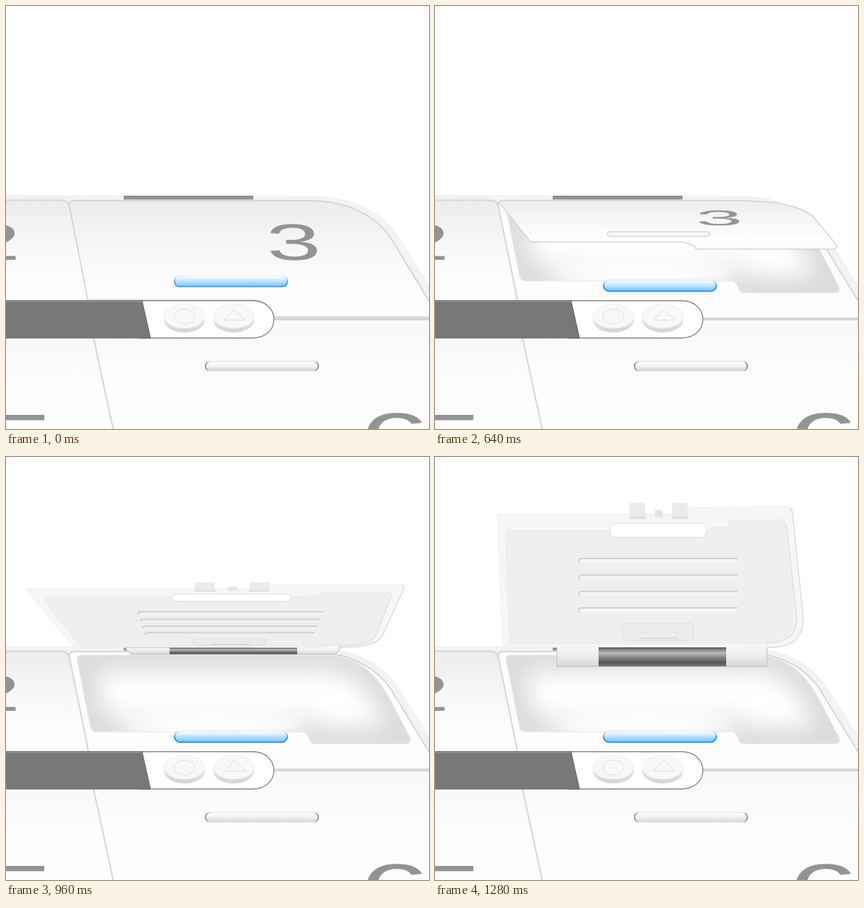
An HTML page that plays this animation: 600 px wide and 600 px high, repeating every 1920 ms.

```html
<!DOCTYPE html>
<html lang="en">
<head>
<meta charset="utf-8">
<title>Compartment lid</title>
<style>
  html, body { margin: 0; width: 100%; height: 100%; overflow: hidden; background: #fff; }
  svg { display: block; width: 100%; height: 100%; }
  text { font-family: "Liberation Sans", Arial, sans-serif; fill: #939393; text-anchor: middle; }
  .seam { fill: none; stroke: #d6d6d6; stroke-width: 2; }
</style>
</head>
<body>
<svg viewBox="0 0 600 600">
  <defs>
    <linearGradient id="panel" x2="0" y2="1">
      <stop stop-color="#ececec"/><stop offset=".25" stop-color="#f3f3f3"/><stop offset=".8" stop-color="#fefefe"/>
    </linearGradient>
    <linearGradient id="lower" x2="0" y2="1">
      <stop stop-color="#f8f8f8"/><stop offset=".5" stop-color="#fdfdfd"/>
    </linearGradient>
    <linearGradient id="blue" x2="0" y2="1">
      <stop stop-color="#fcfeff"/><stop offset=".25" stop-color="#e6f3ff"/><stop offset=".85" stop-color="#8ccaff"/><stop offset="1" stop-color="#9ad1ff"/>
    </linearGradient>
    <linearGradient id="paleBlue" x2="0" y2="1">
      <stop offset=".1" stop-color="#fff"/><stop offset=".45" stop-color="#f2f9ff"/><stop offset=".9" stop-color="#bfe0fa"/>
    </linearGradient>
    <linearGradient id="blueEdge" x2="0" y2="1">
      <stop stop-color="#eef1f4"/><stop offset=".25" stop-color="#a9cdec"/><stop offset=".55" stop-color="#2e9bf2"/><stop offset="1" stop-color="#1e94f4"/>
    </linearGradient>
    <linearGradient id="grey" x2="0" y2="1">
      <stop stop-color="#fff"/><stop offset=".45" stop-color="#f4f4f4"/><stop offset="1" stop-color="#d2d2d2"/>
    </linearGradient>
    <linearGradient id="greyEdge">
      <stop stop-color="#777"/><stop offset=".04" stop-color="#e6e6e6"/><stop offset=".96" stop-color="#e6e6e6"/><stop offset="1" stop-color="#777"/>
    </linearGradient>
    <linearGradient id="metal" x2="0" y2="1">
      <stop stop-color="#505050"/><stop offset=".1" stop-color="#7c7c7c"/><stop offset=".3" stop-color="#bcbcbc"/>
      <stop offset=".5" stop-color="#8c8c8c"/><stop offset=".8" stop-color="#585858"/><stop offset="1" stop-color="#767676"/>
    </linearGradient>
    <linearGradient id="hingeFill" x2="0" y2="1">
      <stop stop-color="#f4f4f4"/><stop offset=".4" stop-color="#efefef"/><stop offset="1" stop-color="#d6d6d6"/>
    </linearGradient>
    <linearGradient id="buttonSide" x2="0" y2="1">
      <stop stop-color="#f5f5f5"/><stop offset="1" stop-color="#d4d4d4"/>
    </linearGradient>
    <filter id="soft" x="-30%" y="-60%" width="160%" height="220%"><feGaussianBlur stdDeviation="16"/></filter>
    <path id="cavity" d="M106,281H460C508,286 528,314 545,344L573,398Q576,407 566,407H438Q432,407 430,399Q427,390 419,390H128Q122,390 120,384L101,288Q100,281 106,281Z"/>
    <clipPath id="cavityClip"><use href="#cavity"/></clipPath>
    <g id="button">
      <ellipse cy="5" rx="29" ry="17" fill="url(#buttonSide)"/>
      <ellipse cy="-1" rx="29" ry="17" fill="#f8f8f8" stroke="#efefef"/>
    </g>
  </defs>

  <!-- body -->
  <path d="M0,269L430,270C502,271 538,298 558,330L600,397V600H0Z" fill="#f3f3f3" stroke="#eee"/>
  <path d="M0,276H80Q88,276 89,283L117,418H0Z" fill="url(#panel)"/>
  <path d="M90,283Q89,276 97,276H430C490,277 525,300 545,328L600,418V446H120Z" fill="#fdfdfd"/>
  <path class="seam" d="M0,275.500H80Q88,276 89.500,284Q89,276 97,276H430C490,277 525,300 545,328L600,418M89.500,282L117,418"/>
  <path d="M0,471H124L152,600H0Z" fill="url(#lower)"/>
  <path d="M118,446H600V600H152Z" fill="url(#lower)"/>
  <path class="seam" d="M124,470L152,600"/>
  <rect x="167" y="269" width="184" height="5.500" fill="#8f918f"/>
  <text transform="matrix(1.91 0 0 1 -18 360)" font-size="72.600">2</text>
  <text transform="matrix(1.8 0 0 1 19 649)" font-size="100">5</text>
  <text transform="matrix(1.8 0 .05 1 554 647)" font-size="100">6</text>

  <use href="#cavity" fill="#fff"/>
  <g clip-path="url(#cavityClip)">
    <use href="#cavity" fill="none" stroke="#dadada" stroke-width="46" filter="url(#soft)"/>
    <ellipse cx="295" cy="380" rx="135" ry="28" fill="#fff" filter="url(#soft)"/>
  </g>
  <use href="#cavity" fill="none" stroke="#e9e9e9"/>
  <rect x="239" y="388.500" width="160" height="16" rx="8" fill="url(#blue)" stroke="url(#blueEdge)" stroke-width="2"/>

  <g id="outer">
    <path class="fold" d="M90,283Q89,276 97,276L430,276C490,277 525,300 545,328L605,427Q611,441 602,441L380,441C378,428 366,417 348,417L116,417Z" fill="url(#panel)" stroke="#d4d4d4" stroke-width="1.500"/>
    <text id="three" font-size="72.600">3</text>
    <path id="slot" class="fold" stroke-width="1.500"/>
    <path id="slotEnds" d="M242,387Q237,391 244,397M397,387Q402,391 395,397" fill="none" stroke="#3d9fee" stroke-width="1.500"/>
  </g>

  <path class="seam" d="M378,444H600" style="stroke-width:4"/>

  <!-- control strip -->
  <path d="M190,418H350C367,418 380,429 380,444.500S367,471 350,471H190Z" fill="#fff" stroke="#858585" stroke-width="1.300"/>
  <path d="M0,417H193L205,471H0Z" fill="#787878"/>
  <path d="M0,418.500H193" stroke="#8a8a8a" stroke-width="3"/>
  <path d="M193,418L205,471H0" fill="none" stroke="#666"/>
  <use href="#button" x="253" y="441"/>
  <ellipse cx="253" cy="440.500" rx="15" ry="10.500" fill="none" stroke="#dedede"/>
  <use href="#button" x="323" y="441"/>
  <path d="M310,445.500L324,430.500L340,445.500Z" fill="none" stroke="#dedede"/>
  <rect x="283" y="504" width="160" height="14" rx="7" fill="url(#grey)" stroke="url(#greyEdge)" stroke-width="1.500"/>

  <path id="sliver" d="M20,280Q150,274 304,274.500Q490,270 572,281Q440,276 304,278Q150,277 20,280Z" fill="#f7f7f7" stroke="#e2e2e2" stroke-width=".7"/>
  <g id="inner"></g>
  <g id="hinge">
    <path id="hingeBody" fill="url(#hingeFill)" stroke="#bdbdbd" vector-effect="non-scaling-stroke"/>
    <rect x="232" y="0" width="181" height="1" fill="url(#metal)"/>
  </g>
</svg>
<script>
const LOOP = 1920, STEP = 40, PRESS = 360, EDGE_ON = 840, OPEN = 1280;
const $ = id => document.getElementById(id);

const roundRect = (x, y, w, h, r) => {
  const X = x + w, Y = y + h;
  return `M${x + r},${y}L${X - r},${y}Q${X},${y} ${X},${y + r}L${X},${Y - r}Q${X},${Y} ${X - r},${Y}` +
    `L${x + r},${Y}Q${x},${Y} ${x},${Y - r}L${x},${y + r}Q${x},${y} ${x + r},${y}Z`;
};

function addInner(d, fill, stroke = 'none', width = 1) {
  const path = document.createElementNS('http://www.w3.org/2000/svg', 'path');
  const attrs = { d, fill, stroke, 'stroke-width': width, class: 'lift' };
  for (const name in attrs) path.setAttribute(name, attrs[name]);
  $('inner').append(path);
}

// Underside of the lid, laid out as it looks when fully open.
function buildInner() {
  addInner('M88,80L358,80L358,72L500,70Q506,70 507,78L522,225C523,260 506,270 472,270L96,270Z', '#f6f6f6', '#f0f0f0');
  addInner('M503,71Q506,72 507,79L522,225C523,260 506,270 472,270', 'none', '#dedede', 1.5);
  addInner('M108,103L390,103L394,100L416,99L418,91L490,89Q497,89 498,96L513,225C514,254 500,262 470,264L106,265L100,113Q100,103 108,103Z', '#efefef', '#e9e9e9');
  addInner('M498,96L513,225C514,254 500,262 470,264', 'none', '#e1e1e1', 1.5);
  for (const x of [276, 336]) {
    addInner(roundRect(x, 65, 22, 23, 1), '#ebebeb');
    addInner(`M${x},84L${x + 23},84L${x + 23},88L${x},88Z`, '#dfdfdf');
  }
  addInner(roundRect(312, 75, 11, 11, 1), '#e6e6e6');
  addInner(roundRect(248, 94, 137, 20, 9), '#fff', '#dcdcdc');
  for (const y of [144, 167.5, 190.5, 214]) {
    addInner(`M207,${y}L429,${y}L429,${y + 6}L207,${y + 6}Q202,${y + 3} 207,${y}Z`, '#f5f5f5');
    addInner(`M205,${y + 6}Q202,${y + 1} 208,${y}L429,${y}`, 'none', '#d0d0d0', 2);
  }
  addInner(roundRect(266, 236, 101, 24, 6), '#ebebeb', '#dcdcdc');
  addInner('M291,256L343,256L343,249L291,249Z', '#eee', '#e2e2e2');
  addInner('M291,257L343,257', 'none', '#cfcfcf');
}

const clamp = v => Math.min(1, Math.max(0, v));
const inOut = (t, power) => t < .5 ? (2 * t) ** power / 2 : 1 - (2 - 2 * t) ** power / 2;

const mapPath = (d, project) => d.replace(/(-?[\d.]+),(-?[\d.]+)/g,
  (_, x, y) => project(+x, +y).map(v => v.toFixed(2)).join(','));

const templates = selector => [...document.querySelectorAll(selector)]
  .map(el => ({ el, d: el.getAttribute('d') }));
const show = (id, visible) => $(id).setAttribute('display', visible ? 'inline' : 'none');

$('slot').setAttribute('d', roundRect(239, 382.5, 160, 15.5, 7.5));
buildInner();
const foldPaths = templates('.fold'), liftPaths = templates('.lift');

function drawOuter(time) {
  const closing = inOut(clamp((time - PRESS) / 520), 2.3);
  const pull = closing ** .55, flat = 1 - closing;
  const fold = (x, y) => [
    x + (y - 276) / 164 * pull * (31 - 83 * (x - 116) / 491),
    276 + (y - 276) * flat
  ];
  for (const { el, d } of foldPaths) el.setAttribute('d', mapPath(d, fold));
  $('three').setAttribute('transform',
    `matrix(${1.91 * (1 - .18 * pull)} 0 ${.07 * flat} ${flat} ${409.5 - 8 * pull} ${276 + 84 * flat})`);

  const [fill, stroke] = time < PRESS ? ['url(#blue)', 'url(#blueEdge)']
    : time < PRESS + STEP ? ['url(#paleBlue)', '#c9ced2'] : ['#f8f8f8', '#d8d8d8'];
  $('slot').setAttribute('fill', fill);
  $('slot').setAttribute('stroke', stroke);
  show('slotEnds', time >= PRESS && time < PRESS + STEP);
}

function drawInner(time) {
  const t = clamp((time - EDGE_ON) / (OPEN - EDGE_ON));
  const angle = inOut(t ** .9, 1.7) * Math.PI / 2;
  const sin = Math.sin(angle), cos = Math.cos(angle);
  const lift = (x, y) => {
    const scale = 1 / (1 - .24 * cos * (270 - y) / 195);
    return [304 + (x - 304) * scale, 270 - (270 - y) * sin * scale];
  };
  for (const { el, d } of liftPaths) el.setAttribute('d', mapPath(d, lift));
  const taper = 4 * cos;
  $('hingeBody').setAttribute('d',
    `M${173 - taper},0L${173 + taper},1H${471 - taper}L${471 + taper},0`);
  $('hinge').setAttribute('transform', `translate(0 ${271 - sin}) scale(1 ${27 * sin})`);
}

function draw(time) {
  const lifted = time > EDGE_ON;
  show('outer', time < EDGE_ON);
  show('sliver', time >= EDGE_ON && time < EDGE_ON + 2 * STEP);
  show('inner', lifted);
  show('hinge', lifted);
  if (time < EDGE_ON) drawOuter(time);
  else if (lifted) drawInner(time);
}

const start = performance.now();
function tick() {
  const elapsed = (performance.now() - start) % LOOP;
  draw(Math.floor(elapsed / STEP) * STEP);
  requestAnimationFrame(tick);
}
tick();
</script>
</body>
</html>
```
